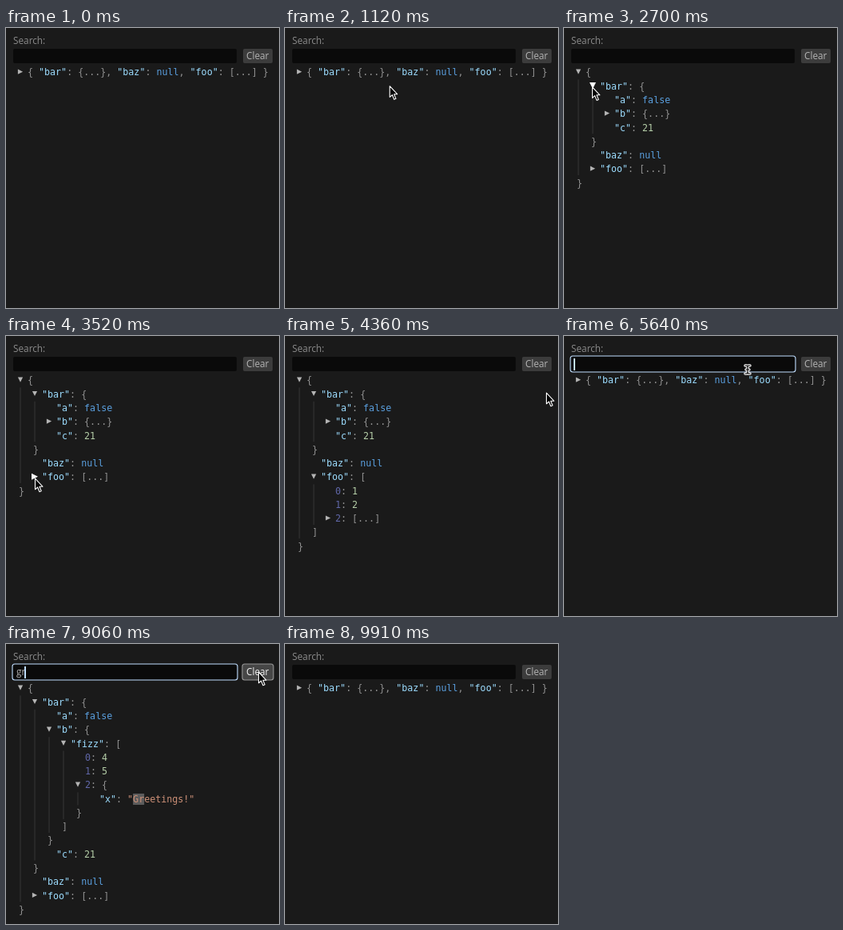
An HTML page with a canvas that plays this animation: 342 by 350 pixels, repeating every 10 s.

```html
<!DOCTYPE html>
<html lang="en">
<head>
<meta charset="utf-8">
<title>JSON tree search</title>
<style>
  html, body { margin: 0; width: 100%; height: 100%; overflow: hidden; background: #1a1a1a; }
  canvas { display: block; }
</style>
</head>
<body>
<canvas id="stage" width="342" height="350"></canvas>
<script>
const ctx = document.getElementById('stage').getContext('2d');
const LOOP = 10000, TOP = 59.4, ROW = 17.28, INDENT = 18, CHAR = 7.02, FOLD_MS = 83;
const MONO = '11.66px "DejaVu Sans Mono", monospace';
const SANS = '400 11.8px "Open Sans", sans-serif';
const COLOR = {
  key: '#9cdcfe', index: '#6067a8', literal: '#5a9fde', number: '#b5cea8',
  string: '#ce9178', mark: '#929292', guide: '#363636', focus: '#c0deff'
};

const data = {
  bar: { a: false, b: { fizz: [4, 5, { x: 'Greetings!' }] }, c: 21 },
  baz: null,
  foo: [1, 2, [3, 4]]
};

const CLEAR_1 = 4950, FOCUS = 5360, CLEAR_2 = 9200;
const TYPE_G = 6610, TYPE_R = 7640;
const found = [TYPE_G, CLEAR_2];
// Spans during which each path is unfolded
const unfolded = {
  '': [[1640, CLEAR_1], found],
  '/bar': [[2350, CLEAR_1], found],
  '/foo': [[3610, CLEAR_1]],
  '/bar/b': [found],
  '/bar/b/fizz': [found],
  '/bar/b/fizz/2': [found]
};

// Pointer paths: [time, x, y]
const pointerPaths = [
  [[730, 318, 105], [1400, 18, 53], [1850, 18, 54], [1970, 18, 69], [2200, 35, 71],
   [2650, 35, 71], [3200, 36, 178], [3720, 36, 178], [4340, 327, 71], [4540, 327, 71],
   [4820, 315, 35], [5040, 315, 35], [5360, 230, 41], [5640, 230, 41], [6070, 346, 44]],
  [[8690, 346, 48], [9040, 316, 35], [9310, 316, 35], [9650, 346, 46]]
];

let now = 0, pointer = null, query = '';

const clamp = v => Math.max(0, Math.min(1, v));
const during = (from, to) => now >= from && now < to;
const isBranch = v => v !== null && typeof v === 'object';
const brackets = v => Array.isArray(v) ? '[]' : '{}';
const isOpen = path => (unfolded[path] || []).some(([a, b]) => during(a, b));
const openness = path => Math.max(0, ...(unfolded[path] || []).map(([a, b]) =>
  now < a ? 0 : now < b ? clamp((now - a) / FOLD_MS) : clamp(1 - (now - b) / FOLD_MS)));
const pointerIn = (x, y, w, h) =>
  pointer && pointer.x >= x && pointer.x <= x + w && pointer.y >= y && pointer.y <= y + h;

function pointerAt(time) {
  for (const path of pointerPaths) {
    for (let i = 1; i < path.length; i++) {
      const [t0, x0, y0] = path[i - 1], [t1, x1, y1] = path[i];
      if (time < t0 || time >= t1) continue;
      const k = (time - t0) / (t1 - t0), e = k * k * (3 - 2 * k);
      return { x: x0 + (x1 - x0) * e, y: y0 + (y1 - y0) * e };
    }
  }
  return null;
}

function box(x, y, w, h, fill, stroke) {
  ctx.beginPath();
  ctx.roundRect(x, y, w, h, stroke ? 3 : 2);
  ctx.fillStyle = fill;
  ctx.fill();
  if (!stroke) return;
  ctx.strokeStyle = stroke;
  ctx.lineWidth = 1.1;
  ctx.stroke();
}

function label(text, x, y, color) {
  ctx.font = SANS;
  ctx.fillStyle = color;
  ctx.fillText(text, x, y);
}

// Draws [text, color] pieces in a fixed-pitch row
function pieces(list, x, y) {
  y = Math.round(y);
  ctx.font = MONO;
  for (const [text, color] of list) {
    if (query && color === COLOR.string) {
      for (const hit of text.matchAll(new RegExp(query, 'gi'))) {
        ctx.fillStyle = '#5c5c5c';
        ctx.fillRect(x + hit.index * CHAR, y - 11, query.length * CHAR, 14);
      }
    }
    ctx.fillStyle = color;
    ctx.fillText(text, x, y);
    x += text.length * CHAR;
  }
}

function valuePieces(v) {
  if (isBranch(v)) return [[brackets(v).split('').join('...'), COLOR.mark]];
  if (typeof v === 'number') return [[String(v), COLOR.number]];
  if (typeof v === 'string') return [[`"${v}"`, COLOR.string]];
  return [[String(v), COLOR.literal]];
}

const keyPieces = (key, inArray) =>
  [inArray ? [key, COLOR.index] : [`"${key}"`, COLOR.key], [': ', COLOR.mark]];

function previewPieces(v) {
  const list = [['{ ', COLOR.mark]];
  Object.entries(v).forEach(([key, child], i) => {
    if (i) list.push([', ', COLOR.mark]);
    list.push(...keyPieces(key), ...valuePieces(child));
  });
  return [...list, [' }', COLOR.mark]];
}

function arrow(x, y, turn) {
  const hot = pointerIn(x - 8, y - 8, 16, 16), r = hot ? 4 : 3.1;
  ctx.save();
  ctx.translate(x, y);
  ctx.rotate((turn - 1) * Math.PI / 2);
  ctx.fillStyle = hot ? '#ffffff' : '#b4b4b4';
  ctx.beginPath();
  ctx.moveTo(-r, -r);
  ctx.lineTo(r, -r);
  ctx.lineTo(0, r);
  ctx.fill();
  ctx.restore();
}

function bodyHeight(v, path) {
  return Object.entries(v).reduce((sum, [key, child]) => sum + nodeHeight(child, `${path}/${key}`), 0);
}

function nodeHeight(v, path) {
  if (!isBranch(v)) return ROW;
  const open = openness(path);
  return ROW * (isOpen(path) ? 2 : 1) + (open ? open * bodyHeight(v, path) : 0);
}

// y is the baseline of the node's first row
function drawNode(v, path, prefix, depth, y) {
  const x = 27 + INDENT * depth, gutter = x - 9;
  if (!isBranch(v)) return pieces([...prefix, ...valuePieces(v)], x, y);

  const open = openness(path), shown = isOpen(path), marks = brackets(v);
  const head = shown ? [[marks[0], COLOR.mark]] : path ? valuePieces(v) : previewPieces(v);
  pieces([...prefix, ...head], x, y);
  arrow(gutter, y - 4.7, open);
  if (!open) return;

  const height = open * bodyHeight(v, path);
  ctx.save();
  ctx.beginPath();
  ctx.rect(0, y + 4, 342, height);
  ctx.clip();
  ctx.fillStyle = COLOR.guide;
  ctx.fillRect(gutter - 0.5, y + 5, 1, height - 1);
  let childY = y + ROW;
  for (const [key, child] of Object.entries(v)) {
    const childPath = `${path}/${key}`;
    drawNode(child, childPath, keyPieces(key, Array.isArray(v)), depth + 1, childY);
    childY += nodeHeight(child, childPath);
  }
  ctx.restore();
  if (shown) pieces([[marks[1], COLOR.mark]], gutter - 2, y + ROW + height);
}

function drawToolbar() {
  label('Search:', 9, 20, '#8c8c8c');

  const focused = during(FOCUS, CLEAR_2);
  const stroke = focused ? COLOR.focus : pointerIn(9, 26, 280, 18) ? '#969696' : null;
  if (stroke) box(8, 25, 282, 20, '#0a0a0a', stroke);
  else box(9, 26, 280, 18, '#0a0a0a');
  label(query, 13, 39, '#b4b4b4');
  if (focused) {
    ctx.fillStyle = COLOR.focus;
    ctx.fillRect(12 + Math.round(ctx.measureText(query).width), 28, 2, 15);
  }

  const hot = pointerIn(297, 26, 37, 18);
  const pressed = [CLEAR_1, CLEAR_2].some(t => during(t - 80, t));
  if (hot) box(296, 25, 39, 20, pressed ? '#373737' : '#464646', pressed ? '#ffffff' : '#969696');
  else box(297, 26, 37, 18, '#3c3c3c');
  label('Clear', 301, 39, hot ? '#f0f0f0' : '#b4b4b4');
}

const arrowPointer = new Path2D('M.5 .2V13.8L3.6 11L6 16.8L8.2 15.8L5.9 10.2H9.9Z');
const textPointer = new Path2D('M-3 -4H-1L0 -3L1 -4H3M0 -3V5M-3 6H-1L0 5L1 6H3M-2 1H2');

function drawPointer() {
  if (!pointer) return;
  ctx.save();
  ctx.translate(pointer.x, pointer.y);
  ctx.lineJoin = 'round';
  if (pointerIn(9, 26, 280, 18)) {
    ctx.lineCap = 'round';
    ctx.strokeStyle = '#ffffff';
    ctx.lineWidth = 3.4;
    ctx.stroke(textPointer);
    ctx.strokeStyle = '#000000';
    ctx.lineWidth = 1.2;
    ctx.stroke(textPointer);
  } else {
    ctx.fillStyle = '#000000';
    ctx.fill(arrowPointer);
    ctx.strokeStyle = '#ffffff';
    ctx.lineWidth = 1.1;
    ctx.stroke(arrowPointer);
  }
  ctx.restore();
}

function frame() {
  now = performance.now() % LOOP;
  pointer = pointerAt(now);
  query = during(TYPE_G, TYPE_R) ? 'g' : during(TYPE_R, CLEAR_2) ? 'gr' : '';
  ctx.fillStyle = '#1a1a1a';
  ctx.fillRect(0, 0, 342, 350);
  drawToolbar();
  drawNode(data, '', [], 0, TOP);
  drawPointer();
  requestAnimationFrame(frame);
}
frame();
</script>
</body>
</html>
```
